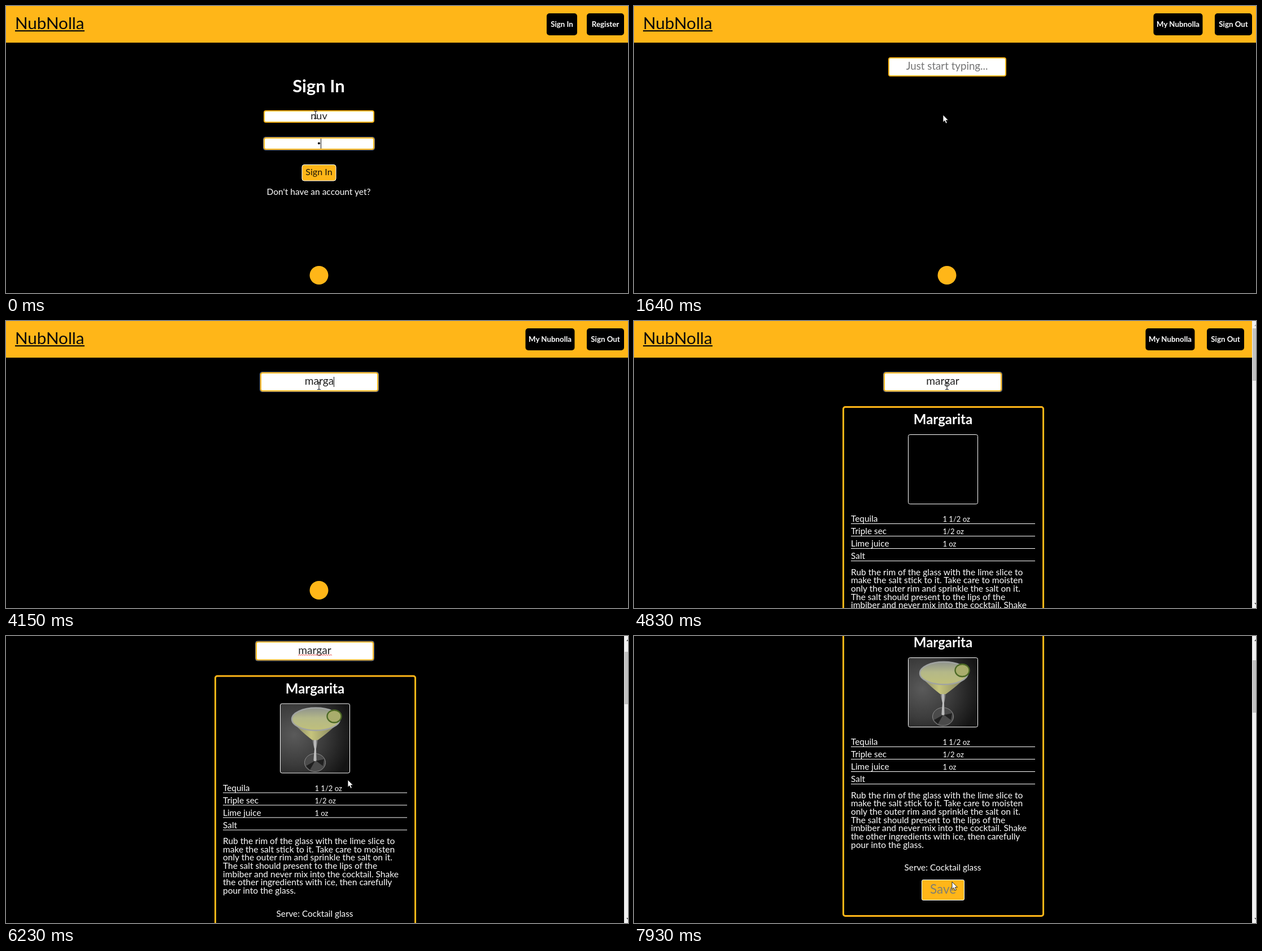
These frames come from a looping animation (1101x509 px, 8000 ms). An HTML page:

```html
<!DOCTYPE html>
<html lang="en">
<head>
<meta charset="utf-8">
<title>Cocktail search</title>
<style>
html, body { margin: 0; width: 100%; height: 100%; overflow: hidden; background: #000; }
svg { display: block; width: 100%; height: 100%; }
text { font-family: Lato, "Open Sans", sans-serif; white-space: pre; }
.bold { font-weight: 700; }
</style>
</head>
<body>
<svg id="stage" viewBox="0 0 1101 509" xmlns="http://www.w3.org/2000/svg">
  <defs>
    <radialGradient id="wall" cx=".2" cy=".45" r=".85">
      <stop offset="0" stop-color="#5a5a5a"/>
      <stop offset=".5" stop-color="#3c3c3c"/>
      <stop offset="1" stop-color="#141414"/>
    </radialGradient>
    <linearGradient id="drink" x1="0" y1="0" x2="0" y2="1">
      <stop offset="0" stop-color="#8f938c"/>
      <stop offset=".45" stop-color="#b4b888"/>
      <stop offset="1" stop-color="#c0c07a"/>
    </linearGradient>
    <linearGradient id="cone" x1="0" y1="0" x2="1" y2="0">
      <stop offset="0" stop-color="#7c7c68"/>
      <stop offset=".4" stop-color="#c6c47c"/>
      <stop offset="1" stop-color="#77775a"/>
    </linearGradient>
    <linearGradient id="stem" x1="0" y1="0" x2="1" y2="0">
      <stop offset="0" stop-color="#3a3a3a"/>
      <stop offset=".5" stop-color="#cfcfcf"/>
      <stop offset="1" stop-color="#3a3a3a"/>
    </linearGradient>
    <clipPath id="field"><rect x="452" y="94" width="205" height="23"/></clipPath>
  </defs>
  <rect width="1101" height="509"/>
  <g id="page">
    <rect id="bar" width="1101" height="65" fill="#ffb618"/>
    <g id="brand"></g>
    <g id="guest"></g>
    <g id="member"></g>
    <g id="login"></g>
    <g id="search">
      <g id="box"></g>
      <g id="boxFocus"></g>
      <g clip-path="url(#field)">
        <text id="hint" x="554" y="113" font-size="18.7" text-anchor="middle" fill="#757575">Just start typing...</text>
        <text id="query" x="554.5" y="113" font-size="19.2" text-anchor="middle" fill="#222"></text>
      </g>
      <path id="squiggle" fill="none" stroke="#e8504a" stroke-width="1"/>
      <rect id="caret" y="99" width="1" height="18" fill="#111"/>
    </g>
    <g id="card"></g>
  </g>
  <circle id="badge" cx="554" cy="477.5" r="16.5" fill="#ffb618"/>
  <g id="scroll">
    <rect x="1094" width="7" height="509" fill="#f1f1f1"/>
    <rect id="thumb" x="1095" width="6" height="93" fill="#c1c1c1"/>
    <path id="up" d="M1098 9l4-4v4z"/>
    <path d="M1098 500l4 4v-4z" fill="#505050"/>
  </g>
  <g id="mouse">
    <path id="arrow" d="M0 0V13.2L3 10.5L5 15.3L7.4 14.3L5.3 9.7H9.4Z" fill="#fff" stroke="#000" stroke-width=".8"/>
    <path id="beam" d="M-3 -6.5H-1L0 -5.5L1 -6.5H3M0 -5.5V5.5M-3 6.5H-1L0 5.5L1 6.5H3" fill="none" stroke="#222" stroke-width="1.1"/>
    <path id="hand" d="M-1.3 1Q0 -.6 1.3 1V5.5Q3 4.4 4 6Q5.8 5.2 6.6 6.8Q9 6.2 9 8.5V11.5L7.5 15.5H0L-3.6 9.8Q-3.6 7.8 -1.3 9.6Z" fill="#fff" stroke="#000" stroke-width=".9" stroke-linejoin="round"/>
  </g>
</svg>
<script>
const LOOP = 8000, GOLD = '#ffb618', STEP = 81.5;
const $ = id => document.getElementById(id);
const show = (id, on) => $(id).setAttribute('visibility', on ? 'visible' : 'hidden');
const move = (id, x, y) => $(id).setAttribute('transform', `translate(${x} ${y})`);

const txt = (s, x, y, size, o = {}) =>
  `<text x="${x}" y="${y}" font-size="${size}" fill="${o.fill || '#fff'}" class="${o.bold ? 'bold' : ''}"` +
  ` text-anchor="${o.left ? 'start' : 'middle'}"${o.id ? ` id="${o.id}"` : ''}>${s}</text>`;
const rect = (x, y, w, h, r, fill, line = 'none', lw = 1) =>
  `<rect x="${x}" y="${y}" width="${w}" height="${h}" rx="${r}" fill="${fill}" stroke="${line}" stroke-width="${lw}"/>`;
const button = (s, x, w) => rect(x, 13, w, 39, 5, '#000') + txt(s, x + w / 2, 37, 13.3, { bold: true });
const input = (x, y, w, h) => rect(x + 1, y + 1, w - 2, h - 2, 3, '#fff', GOLD, 2);
const ring = (x, y, w, h) => rect(x - .5, y - .5, w + 1, h + 1, 3.5, 'none', '#66758f');

$('brand').innerHTML = txt('NubNolla', 16, 41, 29.6, { left: true, fill: '#0a0a0a' }) + rect(16, 43, 123, 2.2, 0, '#0a0a0a');
$('guest').innerHTML = button('Sign In', 957, 54) + button('Register', 1028, 66);
$('member').innerHTML = button('My Nubnolla', 919.5, 87) + button('Sign Out', 1028, 66);

$('login').innerHTML =
  txt('Sign In', 553.5, 153, 31, { bold: true }) +
  input(456, 185, 196, 22) + txt('nuv', 554, 201, 18, { fill: '#222' }) +
  input(456, 233, 196, 22) + ring(456, 233, 196, 22) +
  '<g id="dots" fill="#111"></g><rect id="pwCaret" y="235" width="1" height="18" fill="#111"/>' +
  rect(524, 281.5, 60, 28.5, 4, GOLD, '#fff') + txt('Sign In', 554, 300, 16.1, { fill: '#1c1608' }) +
  txt('Don\'t have an account yet?', 553.5, 335, 15.5);

$('box').innerHTML = input(450, 91, 209, 34);
$('boxFocus').innerHTML = ring(450, 91, 209, 34);
$('squiggle').setAttribute('d', 'M525 116' + 'l2 -1.6l2 1.6'.repeat(15));

const photo =
  rect(486, 202, 122, 122, 2, 'url(#wall)') +
  '<ellipse cx="547" cy="306" rx="18.5" ry="16" fill="#4a4a4a" stroke="#8c8c8c"/>' +
  '<path d="M531 312L547 303L538 319ZM549 303L563 300L561 312Z" fill="#1f1f1f"/>' +
  '<path d="M541 262L546 282L544 302Q547 305 550 302L549 282L553 262Z" fill="url(#stem)"/>' +
  '<path d="M506 231Q514 244 542 266H552Q582 244 591 231Z" fill="url(#cone)"/>' +
  '<ellipse cx="548.5" cy="229" rx="42.5" ry="20" fill="url(#drink)" stroke="#a0a3a1" stroke-width="2.4"/>' +
  '<ellipse cx="581" cy="224" rx="12.5" ry="11" fill="#a9ad6c" stroke="#4d6a26" stroke-width="2.4"/>';

const rows = [['Tequila', '1 1/2 oz'], ['Triple sec', '1/2 oz'], ['Lime juice', '1 oz'], ['Salt', '']];
const recipe = [
  'Rub the rim of the glass with the lime slice to',
  'make the salt stick to it. Take care to moisten',
  'only the outer rim and sprinkle the salt on it.',
  'The salt should present to the lips of the',
  'imbiber and never mix into the cocktail. Shake',
  'the other ingredients with ice, then carefully',
  'pour into the glass.'
];
$('card').innerHTML =
  rect(370.5, 152.5, 354, 507, 3.5, 'none', GOLD, 3) +
  txt('Margarita', 547, 183, 24, { bold: true }) +
  `<g id="photo">${photo}</g>` + rect(485.5, 201.5, 123, 123, 3, 'none', '#fff') +
  rows.map(([name, amount], i) =>
    txt(name, 384, 356 + 22 * i, 15.4, { left: true }) +
    txt(amount, 546.5, 356 + 22 * i, 13, { left: true }) +
    rect(384, 359 + 22 * i, 326, 1, 0, '#fff')).join('') +
  recipe.map((s, i) => txt(s, 384, 450.5 + 14.67 * i, 15.5, { left: true })).join('') +
  txt('Serve: Cocktail glass', 546.5, 579, 15.3) +
  rect(509.5, 595.5, 75, 36, 2.5, GOLD, '#fff') +
  txt('Save', 547, 620, 22.5, { id: 'save' });

// value of the last entry whose time has passed
const at = (list, t) => list.filter(k => k[0] <= t).pop();
const blink = (t, since) => Math.floor((t - since) / 532) % 2 === 0;

const typed = [[0, ''], [3680, 'ma'], [3820, 'mar'], [3970, 'marg'], [4150, 'marga'], [4280, 'margar']];
const spots = [
  [0, 548, 193], [1640, 547, 193], [2340, 549, 174], [2420, 552, 136], [2500, 554, 115],
  [5760, 558, 128], [5840, 571, 165], [5920, 588, 212], [6000, 600, 242], [6080, 605, 255],
  [7090, 590, 335], [7170, 576, 400], [7320, 575, 405], [7400, 571, 417],
  [7470, 567, 427], [7540, 564, 433], [7620, 563, 436]
];

function draw(t) {
  const login = t < 1640, found = t >= 4830;
  const notches = (t >= 6230) + (t >= 6700);
  move('page', 0, -STEP * notches);
  $('bar').setAttribute('width', found ? 1094 : 1101);
  show('guest', login);
  show('member', !login);
  move('member', found ? -14 : 0, 0);
  show('badge', !found);

  show('login', login);
  const count = t < 230 ? 1 : t < 400 ? 2 : 3;
  $('dots').innerHTML = Array.from({ length: count }, (_, i) =>
    `<circle cx="${554 + (i - (count - 1) / 2) * 6.5}" cy="243.5" r="2.1"/>`).join('');
  $('pwCaret').setAttribute('x', 554 + 3 * count);
  show('pwCaret', login && (t < 400 || blink(t, 406)));

  const query = at(typed, t)[1], focus = t >= 2660;
  show('search', !login);
  move('search', found ? -8 : 0, 0);
  show('box', !login);
  show('boxFocus', focus);
  show('hint', !login && !query);
  show('query', !login);
  if ($('query').textContent !== query) $('query').textContent = query;
  const half = query ? $('query').getComputedTextLength() / 2 : 0;
  $('caret').setAttribute('x', Math.round(554 + half));
  show('caret', focus && blink(t, query ? Math.min(at(typed, t)[0], 4275) : 2678));
  show('squiggle', t >= 5300);

  show('card', found);
  show('photo', t >= 5210);
  $('save').setAttribute('fill', t < 7780 ? '#1c1608' : '#848070');

  show('scroll', found);
  $('thumb').setAttribute('y', 13 + 15 * notches);
  $('up').setAttribute('fill', notches ? '#505050' : '#a3a3a3');

  const [, x, y] = at(spots, t);
  const beam = login || (t >= 2500 && t < 5840);
  const hand = t >= 7540 && t < 7930;
  move('mouse', x, y);
  show('beam', beam);
  show('hand', hand);
  show('arrow', !beam && !hand);
}

const start = performance.now();
function tick() {
  draw((performance.now() - start) % LOOP);
  requestAnimationFrame(tick);
}
draw(0);
requestAnimationFrame(tick);
</script>
</body>
</html>
```
